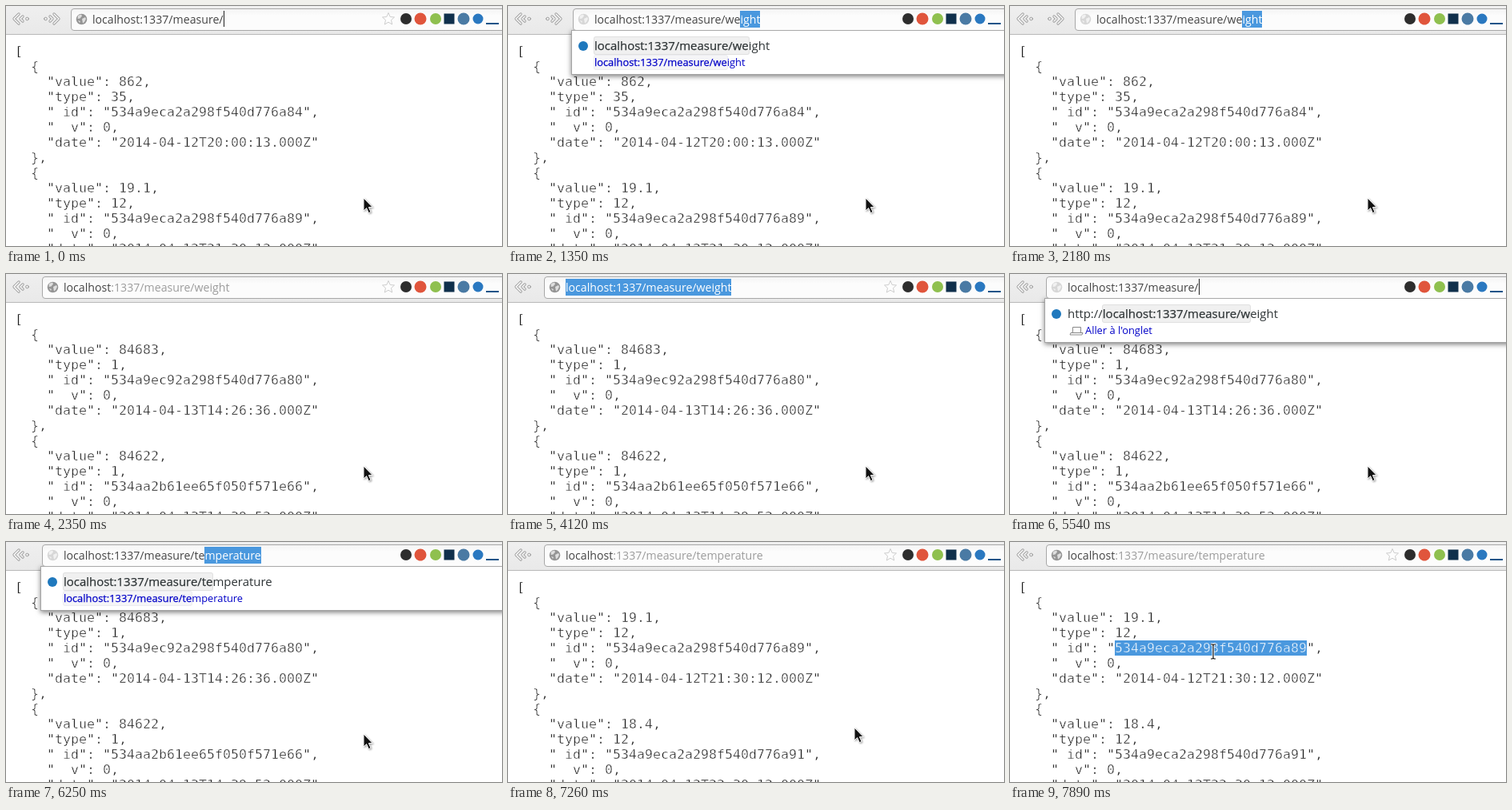
Recreate the animation shown at these times as an HTML page. Size 620 px wide and 300 px high, loop 8000 ms.

```html
<!DOCTYPE html>
<html lang="fr">
<head>
<meta charset="utf-8">
<title>Measure API</title>
<style>
html, body { margin: 0; width: 100%; height: 100%; overflow: hidden; background: #fff; }
#stage { position: relative; width: 620px; height: 300px; overflow: hidden; background: #fff; }
#stage * { box-sizing: border-box; }
svg, #bar, #field, #popup, .line, #page { position: absolute; }
svg { left: 0; top: 0; overflow: visible; }
.line, #page { margin: 0; white-space: pre; }
/* The background-coloured outline thins the letters. */
#page { left: 11px; top: 47px; font: 16.61px/19px "DejaVu Sans Mono", monospace; color: #1c1c1c; -webkit-text-stroke: .5px #fff; }
#page .sel { -webkit-text-stroke-color: #4a98de; }
#tools { position: absolute; width: 620px; height: 36px; background: linear-gradient(#efefef, #e9e9e9); border-bottom: 1px solid #b9b9b9; }
#bar { left: 0; top: 0; font-family: "Open Sans", sans-serif; }
#field { left: 0; top: 3px; width: 700px; height: 28px; border: 1px solid #a8a8a8; border-radius: 4px; background: linear-gradient(#f4f4f4, #fcfcfc 30%); }
.line { left: 27px; }
#url { top: 6px; font-size: 14.15px; line-height: 21px; color: #444; }
#url .path { color: #9c9c9c; }
.sel { display: inline-block; background: #4a98de; color: #fff; }
.caret { display: inline-block; height: 20px; margin-right: -1px; border-left: 1px solid #222; vertical-align: top; }
#popup { left: -2px; top: 30px; width: 700px; height: 56px; background: #fff; border: 1px solid #a4a4a4; box-shadow: 0 2px 6px rgba(0, 0, 0, .5); }
#popup .line { left: 28px; }
#name { top: 8px; font-size: 14.95px; line-height: 21px; color: #2e3436; }
#note { top: 31px; font-size: 12.85px; line-height: 17px; color: #0000c8; }
.hit { display: inline-block; background: #f0f0f0; box-shadow: 0 0 0 1px #e0e0e0; border-radius: 2px; -webkit-text-stroke: .25px; }
#note .hit { background: #f5f5f7; box-shadow: 0 0 0 1px #ececf0; }
#popup .tab { left: 50px; }
</style>
</head>
<body>
<div id="stage">
  <pre id="page"></pre>
  <div id="tools">
    <svg width="80" height="36" fill="none" stroke-linejoin="round" stroke-linecap="round">
      <defs>
        <g id="back">
          <path d="M16 10l-6 6 6 6M21 13l-3 3 3 3" stroke="#9a9a9a" stroke-width="3.2"/>
          <path d="M16 10l-6 6 6 6M21 13l-3 3 3 3" stroke="#f8f8f8" stroke-width="1.6"/>
          <circle cx="26.500" cy="16" r="1.800" fill="#f8f8f8" stroke="#9a9a9a"/>
        </g>
      </defs>
      <use href="#back"/>
      <use href="#back" transform="translate(76 0) scale(-1 1)"/>
    </svg>
  </div>
  <div id="bar">
    <div id="popup">
      <svg width="60" height="56">
        <circle cx="14" cy="19" r="6" fill="#1f78bd"/>
        <g id="laptop" fill="#fff" stroke="#888">
          <path d="M34.500 35.500h10v7h-10z"/>
          <path d="M32 42.500h15l-1 2.500H31z"/>
        </g>
      </svg>
      <div id="name" class="line"></div>
      <div id="note" class="line"></div>
    </div>
    <div id="field"></div>
    <svg id="globe" width="30" height="36">
      <circle cx="13.500" cy="16.500" r="6.800" fill="#959595"/>
      <path d="M9 12l4-1.500 1 2-2.500 3-3 .5zM14 16l4-2 1 2-2 4-2 1.500zM9 18l3 1-1 2z" fill="#dedede"/>
    </svg>
    <div id="url" class="line"></div>
  </div>
  <svg width="620" height="36">
    <path id="star" d="M478 8.500l2.200 5 5.300.5-4 3.600 1.200 5.400-4.700-2.800-4.700 2.800 1.200-5.400-4-3.600 5.300-.5z" fill="#fdfdfd" stroke="#cdcdcd"/>
    <circle cx="500" cy="16" r="7" fill="#2d2d2d"/>
    <circle cx="518" cy="16" r="7.500" fill="#e0553c"/>
    <circle cx="537" cy="16" r="7" fill="#8fc04f"/>
    <rect x="547.500" y="9.500" width="13" height="13" fill="#10304c"/>
    <circle cx="572" cy="16" r="7.500" fill="#4a7aa4"/>
    <circle cx="590" cy="16" r="6.500" fill="#2a78c0"/>
    <rect x="600" y="21" width="16" height="2" fill="#1c5488"/>
  </svg>
  <svg id="pointer" width="20" height="24">
    <path id="arrow" d="M0 0V16l3.600-3.400 2.700 6.100 2.800-1.200-2.700-5.900h4.800z" fill="#111" stroke="#fff" style="filter:drop-shadow(1px 1px 1px #0006)"/>
    <g id="beam" fill="none">
      <path d="M-3-9h2l1 1 1-1h2M0-8V8M-3 9h2l1-1 1 1h2" stroke="#fff" stroke-width="3"/>
      <path d="M-3-9h2l1 1 1-1h2M0-8V8M-3 9h2l1-1 1 1h2" stroke="#111" stroke-width="1.200"/>
    </g>
  </svg>
</div>
<script>
const LOOP = 8000;
const BASE = 'localhost:1337/measure/';
const $ = id => document.getElementById(id);
const span = (cls, text) => text ? `<span class="${cls}">${text}</span>` : '';

// value, type, id, date
const pages = {
  all: [
    ['862', 35, '534a9eca2a298f540d776a84', '2014-04-12T20:00:13'],
    ['19.1', 12, '534a9eca2a298f540d776a89', '2014-04-12T21:30:12']
  ],
  weight: [
    ['84683', 1, '534a9ec92a298f540d776a80', '2014-04-13T14:26:36'],
    ['84622', 1, '534aa2b61ee65f050f571e66', '2014-04-13T14:39:52']
  ],
  temperature: [
    ['19.1', 12, '534a9eca2a298f540d776a89', '2014-04-12T21:30:12'],
    ['18.4', 12, '534a9eca2a298f540d776a91', '2014-04-12T22:30:12']
  ]
};

const typing = (word, count) => ({
  typed: BASE + word.slice(0, count), tail: word.slice(count), focus: true, editing: true
});
const erased = word => typing(word, word.length);
const suggest = (word, count, tab = false) => ({ popup: { word, count, tab } });
const closed = { popup: null };
const loaded = word => ({ page: word, typed: BASE + word, tail: '', focus: false, editing: false });

// Each entry changes part of the state from its time on.
const timeline = [
  [0, { page: 'all', bar: 81, typed: BASE, tail: '', focus: true, editing: false, popup: null, picked: false }],
  [510, typing('weight', 1)],
  [940, suggest('weight', 1)],
  [1000, typing('weight', 2)],
  [1350, suggest('weight', 2)],
  [2180, closed],
  [2220, { ...loaded('weight'), bar: 74 }],
  [2265, { bar: 63 }],
  [2310, { bar: 52 }],
  [2350, { bar: 45 }],
  [4120, { typed: '', tail: BASE + 'weight', focus: true }],
  [4360, { typed: BASE + 'weight', tail: '' }],
  [4720, erased('weigh')],
  [4900, erased('weig')],
  [5080, erased('wei')],
  [5240, erased('we')],
  [5390, erased('w')],
  [5465, suggest('weight', 1, true)],
  [5540, erased('')],
  [5710, typing('temperature', 1)],
  [5765, closed],
  [5820, typing('temperature', 2)],
  [6250, suggest('temperature', 2)],
  [6400, closed],
  [6445, { focus: false, typed: BASE + 'temperature', tail: '' }],
  [6490, loaded('temperature')],
  [7890, { picked: true }]
];

function record([value, type, id, date], picked) {
  return `  {
    "value": ${value},
    "type": ${type},
    "_id": "${picked ? span('sel', id) : id}",
    "__v": 0,
    "date": "${date}.000Z"
  },`;
}

function urlMarkup({ typed, tail, focus }) {
  if (!focus) return 'localhost' + span('path', typed.slice(9));
  return typed + (tail ? span('sel', tail) : '<span class="caret"></span>');
}

function drawPopup(popup) {
  $('popup').style.display = popup ? 'block' : 'none';
  if (!popup) return;
  const { word, count, tab } = popup;
  const match = span('hit', BASE + word.slice(0, count)) + word.slice(count);
  $('name').innerHTML = (tab ? 'http://' : '') + match;
  $('note').innerHTML = tab ? "Aller à l'onglet" : match;
  $('note').classList.toggle('tab', tab);
  $('laptop').style.display = tab ? '' : 'none';
}

function drawState(state) {
  const [first, second] = pages[state.page];
  $('page').innerHTML = ['[', record(first, state.picked), record(second)].join('\n');
  $('bar').style.transform = `translateX(${state.bar}px)`;
  $('url').innerHTML = urlMarkup(state);
  $('globe').style.opacity = state.editing ? .35 : 1;
  $('star').style.display = state.editing ? 'none' : '';
  drawPopup(state.popup);
}

function drawPointer(time) {
  const step = Math.max(0, Math.min(6, Math.floor((time - 7260) / 40) + 1));
  const p = step / 6;
  const ease = p * p * (3 - 2 * p);
  const x = Math.round(447 - 193 * ease), y = Math.round(240 - 103 * ease);
  $('pointer').style.transform = `translate(${x}px, ${y}px)`;
  $('arrow').style.display = step < 6 ? '' : 'none';
  $('beam').style.display = step < 6 ? 'none' : '';
}

let shown = 0;
const start = performance.now();

function frame(now) {
  const time = Math.max(0, now - start) % LOOP;
  const past = timeline.filter(([at]) => at <= time);
  if (past.length !== shown) {
    shown = past.length;
    drawState(Object.assign({}, ...past.map(([, change]) => change)));
  }
  drawPointer(time);
  requestAnimationFrame(frame);
}
frame(start);
</script>
</body>
</html>
```
